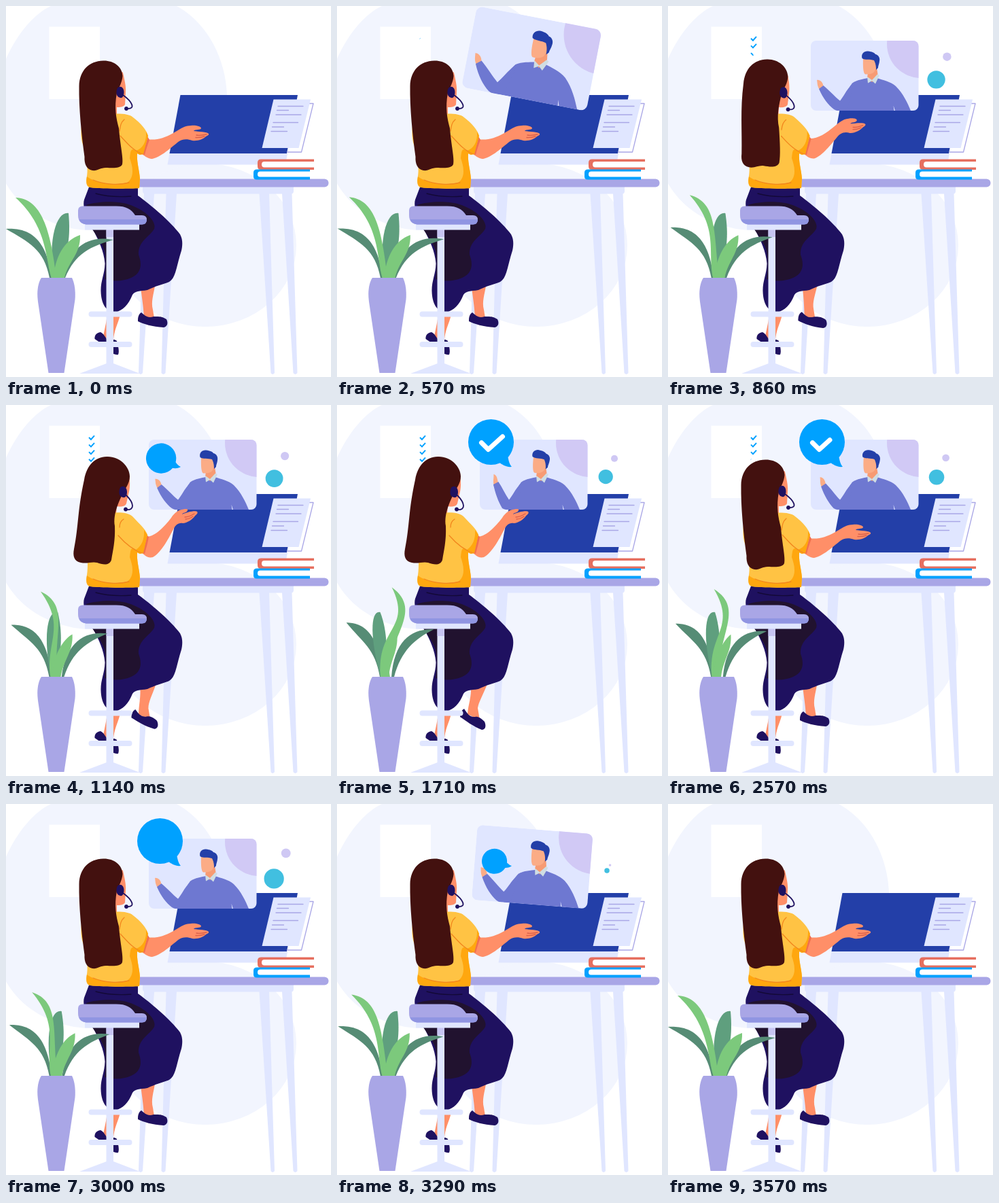
These frames come from a looping animation (478 by 546 pixels, 3640 ms). An HTML page:

```html
<!DOCTYPE html>
<html lang="en">
<head>
<meta charset="utf-8">
<title>Support desk</title>
<style>
html, body { margin: 0; width: 100%; height: 100%; overflow: hidden; background: #fff; }
svg { display: block; width: 478px; height: 546px; }
.haze { fill: #f2f5fe; } .pale { fill: #e0e6ff; } .lilac { fill: #a9a6e6; }
.blue { fill: #233fa8; } .sky { fill: #00a1ff; } .navy { fill: #1f1160; }
.skin { fill: #ff8f68; } .yellow { fill: #ffc344; } .orange { fill: #ffa70f; }
.hair { fill: #43110f; } .dark { fill: #568c75; } .mid { fill: #5f9f7e; } .leaf { fill: #7cc97c; }
.coat { fill: #6e78d1; } .face { fill: #fbac86; }
.line { fill: none; stroke-width: 1.3; stroke-linecap: round; stroke-linejoin: round; }
.rule { stroke: #a9a6e6; } .seam { stroke: #f2861d; } .wire { stroke: #1f1160; stroke-width: 1.8; }
.tick { fill: none; stroke: #00a1ff; stroke-width: 2; }
</style>
</head>
<body>
<svg viewBox="0 0 478 546">
  <defs><clipPath id="frame"><rect x="210" y="51" width="158.5" height="103" rx="8"/></clipPath></defs>

  <g class="haze">
    <path d="M66 0C40 12 12 45 -6 92V250C12 288 45 317 100 328C140 334 175 325 200 310C270 270 325 200 325 130C323 78 297 25 251 0Z"/>
    <ellipse cx="293" cy="352" rx="134" ry="120"/>
  </g>
  <path fill="#fff" d="M63.500 30.500H138V137H63.500Z"/>
  <g id="ticks"></g>

  <!-- desk -->
  <g class="pale">
    <path d="M201 266H423V272Q423 276.500 419 276.500H205Q201 276.500 201 272Z"/>
    <path d="M203 276H218L201 540Q198 544 195 540Z"/>
    <path d="M235.500 276H251L234.500 540Q231.500 544 228.500 540Z"/>
    <path d="M372.500 276H387L395 540Q392 544 389.500 540Z"/>
    <path d="M406 276H420.500L428.500 540Q425.500 544 422.500 540Z"/>
  </g>
  <path class="lilac" d="M190 254.500H468.500A6 6 0 0 1 468.500 266.500H190Z"/>
  <path class="blue" d="M256.500 131H429L413 217H240.500Z"/>
  <path class="pale" d="M240.500 217H414L411 233.500H237.500Z"/>
  <path class="line rule" d="M446 143.500H452L434.500 215H413.500"/>
  <path class="pale" d="M393.500 137.500H448L430.500 209H376.500Z"/>
  <path class="line rule" d="M400 147.500H437M398.500 153.500H415.500M397 160H434M393 171.500H429.500M391.500 178H408.500M390 184.500H413.500"/>
  <path fill="#e66f5f" d="M453 225.500H375Q370 225.500 370 230.500V236Q370 241 375 241H453Z"/>
  <path fill="#fff" d="M453 229H380Q376 229 376 233.200T380 237.500H453Z"/>
  <path class="sky" d="M447 240.500H369Q364 240.500 364 245V251Q364 255.500 369 255.500H447Z"/>
  <path fill="#fff" d="M447 243.500H374Q370 243.500 370 247.700T374 251.500H447Z"/>

  <!-- video call -->
  <circle id="teal" fill="#41bfe0"/>
  <circle id="violet" fill="#cfc8f4"/>
  <g id="card">
    <g clip-path="url(#frame)">
      <path class="pale" d="M210 51H369V154H210Z"/>
      <circle cx="372" cy="56" r="50" fill="#d1c9f5"/>
      <path class="face" data-m="wave" d="M223 123C219 117 220 114 219 109C223 108 228 112 228.500 118Z" data-to="M231 119C229 111 231 108 230.500 102C234 102 236 107 237 114Z"/>
      <path class="coat" d="M254 154C262 140 262 124 271 113.500C278 108.500 288 107.500 294 106H307C316 109 327 111 335 118C346 129 352 142 357 154H334L331.500 146.500L332.500 154Z"/>
      <path class="coat" data-m="wave" d="M222 122C228 136 236 146 244 152C250 156 256 154 264 152L274 112C264 120 260 131 253 139.500C246 134 237 124 228.500 117Z" data-to="M230 117C233 130 237 142 243 152C250 156 256 154 264 152L274 112C264 120 260 131 253 139.500C247 131 243 121 237.500 113Z"/>
      <path fill="#f79b73" d="M294 98L307 90L309 104L300 112L293 105Z"/>
      <g id="head">
        <path class="face" d="M287 77L305 75L309 84C308 90 305 92 304 96C301 100 296 101 290 100.500C287 99 286.500 88 287 77Z"/>
        <path class="blue" d="M285.500 77C283.500 70 289 66 294 66.500C300 67 304 69 305 71C310 72 312 77 311 81C310.500 86 309 88 309 91L306 94C306 87 305 84 303 80C297 78 290 80 285.500 77Z"/>
      </g>
      <path fill="#cfdde3" d="M293 104L294 113.500L300 110L305 114.500L311 102L308 100.500L300 109Z"/>
    </g>
  </g>
  <g id="bubble">
    <circle class="sky" cx="226.500" cy="54.500" r="33.500"/>
    <path class="sky" d="M251 74C252 81 254 88 257 91C250 92 243 88 238 84Z"/>
    <path id="mark" pathLength="1" fill="none" stroke="#fff" stroke-width="7" stroke-linecap="round" stroke-linejoin="round" d="M212.500 55.500L222.500 65.500L243.500 46.500"/>
  </g>

  <!-- woman, lower half -->
  <path class="skin" data-m="foot" d="M198 414L219 412C217 425 213 435 216 447L218 459L203 458C202 442 200 430 198 414Z" data-to="M197 414L221 411C214 428 208 438 207 446L210 464L192 455C193 440 198 430 197 414Z"/>
  <path class="navy" data-m="foot" d="M199 451C194 454 194 460 194 464C202 468 215 472 232 473C237 472 239 467 236 461C229 456 223 457 217 457C208 460 204 455 199 451Z" data-to="M187 447C182 450 181 455 181 459C190 465 200 473 213 478C218 478 220 473 217 466C211 460 207 458 203 459C195 460 191 453 187 447Z"/>
  <path class="skin" d="M150 446L168 454C165 468 158 478 158 494L143 487C145 475 148 465 150 446Z"/>
  <path class="navy" d="M139 480C132 481 130 486 130.500 490C137 495 145 498 150 504C155 511 160 514 165 513C167 508 165 500 163 493C158 488 153 494 149 491C146 488 144 482 139 480Z"/>
  <path class="navy" d="M123 264L194 266V279C212 292 242 317 256 336C261 345 259 355 258 360C250 385 250 400 240 406C230 410 220 412 208 418C196 420 190 419 186 425C180 440 172 448 160 451C147 450 140 438 139.500 420C139 405 145 395 145.500 379C144 360 136 345 130 333C118 315 112 295 115 285Z"/>
  <path fill="#21122f" d="M118 293C135 287 165 287 180 292C206 300 222 318 218 328C211 340 194 346 195 366C201 382 198 394 184 400C172 405 160 406 145 402C147 385 147 375 145 360C140 345 130 335 122 320Z"/>
  <path class="line" stroke="#130936" d="M132 276C150 281 170 281 184 280"/>

  <!-- stool -->
  <g class="pale">
    <path d="M116 321H196V329.500H116ZM147.500 329H158V530H147.500ZM108 541L148 526H158L197 541Z"/>
    <rect x="121.500" y="449.500" width="64" height="8" rx="4"/>
    <rect x="121.500" y="494" width="64" height="8" rx="4"/>
  </g>
  <path fill="#c7c5f2" d="M147.500 329.500H158V340H147.500Z"/>
  <path class="lilac" d="M113 294.500H162C177 294.500 184 299 190 308H200Q207 308 207 314.500T200 321.500H118Q106 320 106 308V301Q106 294.500 113 294.500Z"/>
  <path fill="#9095e2" d="M107.500 314H207Q207 321.500 200 321.500H118Q110 321 107.500 314Z"/>

  <!-- woman, upper half -->
  <path class="skin" data-m="body" d="M208 196C220 198 232 195 246 187C255 182 262 176 272 176C278 175 287 177 287 180C286 183 278 181 276 184C283 185 296 185 298 188C299 190 296 191 294 192C290 196 282 199 274 198C265 195 258 196 252 201C240 211 225 224 214 225C207 224 203 220 199 217Z" data-to="M207 194C220 193 233 179 243 166C246 161 252 155 258 154C263 153 268 152 267 155C266 159 260 158 259 161C265 158 278 155 281 157C283 159 280 161 278 163C275 168 266 174 260 174C254 173 250 176 247 181C241 193 229 217 216 224C208 226 204 221 199 217Z"/>
  <path class="line" stroke="#d9604a" stroke-width="1" data-m="body" d="M280 190C285 191 290 190 295 189M279 193.500C284 194 288 193 292 192" data-to="M263 165C268 165 272 163 277 160M264 168C268 168 272 166 275 164"/>
  <path fill="#f0704f" data-m="body" d="M207 190L211 197C208 205 206 211 204 219L199 217Z" data-to="M205 189L210 194C208 205 206 211 204 219L199 217Z"/>
  <path class="skin" data-m="body" d="M163 92L172 98C174 108 177 118 176 128L175 145C173 149 167 149 163 149L163 161L148 161Z" data-to="M168 92L181 105C183 115 182 125 180 132L177 145C175 150 168 150 163 149L162 161L148 161Z"/>
  <path class="yellow" data-m="body" d="M150 159C166 158 181 158 187 164C198 172 207 183 209 191L201 218C198 220 196 219 193 217C192 230 196 240 197 254L196 268C180 269 140 269 124 267C117 266 118 258 119 250C121 238 118 215 113 204C110 195 110 185 111 175Z" data-to="M150 159C166 158 180 157 188 166C196 175 205 182 208 191L201 218C198 220 196 219 193 217C192 230 196 240 197 254L196 268C180 269 140 269 124 267C117 266 118 258 119 250C121 238 119 225 122 210C124 195 122 185 125 175Z"/>
  <path class="orange" d="M119 251C135 263 162 264 178 260C190 252 186 235 182 224C183 216 183 211 187 211L200 218Q197 220 193 217C192 230 196 240 197 254L196 268C180 269 140 269 124 267Q116 265 119 251Z"/>
  <path class="orange" data-m="body" d="M206 185L209 191L202 218L191 213C201 210 207 200 206 185Z" data-to="M203 184L208 191L202 218L191 213C199 208 204 198 203 184Z"/>
  <path class="line seam" data-m="body" d="M174 167C169 171 168 177 167 184M168 191C175 198 186 213 201 218" data-to="M173 168C168 171 167 176 167 180M165 192C172 200 184 213 201 218"/>
  <path class="line seam" d="M128 256C145 263 165 264 181 260"/>
  <path class="hair" data-m="body" d="M143 80.500C158 80 171 89 171.500 103C171 112 166 120 163 128C159 150 162 165 166 180C168 205 173 225 171 233C168 240 155 238 147 238C138 238 135 243 127 242C118 240 115 232 115.500 222C111 190 107 150 107.500 118C108 95 122 81 143 80.500Z" data-to="M148 76C166 75 182 90 182 105C182 115 176 122 173 128C167 140 157 160 160 178C161 200 157 215 155 228C152 237 142 235 134 232C126 230 120 234 110 232C100 230 98 222 100 212C107 178 105 155 115 110C119 88 131 76.500 148 76Z"/>
  <path class="navy" data-m="body" d="M167 119C171 118 174 123 173.500 128C173 133 171 136 168 135C164 134 162 131 162.500 126C163 122 164 119 167 119Z" data-to="M171 120C175 119 178 123 178 128C178 133 176 137 172 136C168 135 166 132 166.500 127C167 123 168 120 171 120Z"/>
  <path class="line wire" data-m="body" d="M172 131C186 141 191 152 178 151" data-to="M177 133C188 144 190 155 177 154"/>
  <path class="navy" data-m="body" d="M177 148C181 148 181 154 177 154C173 154 173 148 177 148Z" data-to="M176 150.500C180 150.500 180 156.500 176 156.500C172 156.500 172 150.500 176 150.500Z"/>

  <!-- plant -->
  <path class="dark" data-m="sway" d="M0 328C30 326 60 338 67 400L64 400C56 358 34 348 0 328Z" data-to="M14 320C38 320 62 334 67 400L63 400C56 358 38 350 14 320Z"/>
  <path class="dark" data-m="sway" d="M158 344C118 336 92 358 84 400L87 400C102 364 124 354 158 344Z" data-to="M142 330C110 328 84 346 80 400L84 400C94 362 114 344 142 330Z"/>
  <path class="mid" data-m="sway" d="M92 305C75 302 62 340 69 400L76 400C92 360 95 340 92 305Z" data-to="M63 305C49 301 47 340 64 400L72 400C74 360 73 330 63 305Z"/>
  <path class="leaf" data-m="sway" d="M14 282C52 283 66 330 74 400L67 400C58 375 62 325 14 282Z" data-to="M82 268C132 305 70 345 78 400L64 400C58 325 112 330 82 268Z"/>
  <path class="leaf" data-m="sway" d="M109 337C85 345 72 370 70 400L86 400C92 375 110 365 109 337Z" data-to="M88 338C82 345 66 370 66 400L76 400C78 375 90 362 88 338Z"/>
  <path class="lilac" d="M52 400H97C101 408 102.500 420 101.500 432L85.500 540H62.500L47 435C45 420 47 408 52 400Z"/>
</svg>
<script>
const LOOP = 3640, STEP = 71.4;
const $ = id => document.getElementById(id);
const clamp = x => Math.min(1, Math.max(0, x));

// [time, value] stops, eased in and out between neighbours
const tracks = {
  sway: [[360, 0], [1840, 1], [2150, 1], [3570, 0]],
  body: [[600, 0], [1140, 1], [1720, 1], [2430, 0]],
  foot: [[640, 0], [1400, 1], [1740, 1], [2430, 0]],
  wave: [[1080, 0], [1760, 1], [2000, 1], [3000, 0]],
  card: [[210, 0], [570, 1.18], [800, 1], [3070, 1], [3220, 1.18], [3570, 0]],
  bubble: [[930, 0], [1140, .66], [1215, 1.12], [1290, 1], [3000, 1], [3140, 1.1], [3430, 0]],
  dots: [[555, 0], [930, 1.1], [1400, .8], [2430, .8], [2990, 1.1], [3430, 0]],
  mark: [[1300, 0], [1690, 1], [2450, 1], [2900, 0]],
  list: [[540, 0], [1100, 1], [2400, 1], [2930, 0]]
};

function track(name, t) {
  const stops = tracks[name];
  if (t <= stops[0][0]) return stops[0][1];
  for (let i = 1; i < stops.length; i++) {
    const [t0, a] = stops[i - 1], [t1, b] = stops[i];
    if (t <= t1) {
      const x = (t - t0) / (t1 - t0);
      return a + (b - a) * x * x * (3 - 2 * x);
    }
  }
  return stops[stops.length - 1][1];
}

const NUM = /-?[\d.]+/g;
const morphs = [...document.querySelectorAll('[data-m]')].map(el => ({
  el, name: el.dataset.m, from: el.getAttribute('d'), to: el.dataset.to.match(NUM)
}));

function morph({ el, name, from, to }, t) {
  const u = track(name, t);
  let i = 0;
  el.setAttribute('d', from.replace(NUM, n => (+n + (to[i++] - n) * u).toFixed(2)));
}

const ticks = [0, 1, 2, 3].map(i => {
  const p = document.createElementNS('http://www.w3.org/2000/svg', 'path');
  p.setAttribute('d', `M122 ${47.7 + i * 10.7}l3 3l5 -5.5`);
  p.setAttribute('pathLength', 1);
  p.setAttribute('class', 'tick');
  $('ticks').append(p);
  return p;
});

function reveal(el, p) {
  el.style.visibility = p > 0 ? 'visible' : 'hidden';
  el.setAttribute('stroke-dasharray', `${p} 2`);
}

// grow and turn around a corner
function pop(el, s, x, y, turn) {
  el.style.display = s > 0 ? '' : 'none';
  el.setAttribute('transform',
    `translate(${x} ${y}) rotate(${(s - 1) * turn}) scale(${s}) translate(${-x} ${-y})`);
}

function dot(el, x, y, r) {
  el.setAttribute('cx', x);
  el.setAttribute('cy', y);
  el.setAttribute('r', r);
}

function draw(t) {
  morphs.forEach(m => morph(m, t));
  pop($('card'), track('card', t), 370, 146, 61);
  pop($('bubble'), track('bubble', t), 257, 91, 79);
  const q = track('dots', t), w = track('wave', t);
  dot($('violet'), 398 + 12.5 * q, 96 - 21.5 * q, 6.3 * q);
  dot($('teal'), 398 - 3.5 * q, 94 + 14.5 * q, 13.3 * q);
  $('head').setAttribute('transform', `rotate(${4 * w} 300 106)`);
  reveal($('mark'), track('mark', t));
  const shown = track('list', t) * ticks.length;
  ticks.forEach((el, i) => reveal(el, clamp(shown - i)));
}

const start = performance.now();
function tick() {
  const t = (performance.now() - start) % LOOP;
  draw(Math.floor((t + 5) / STEP) * STEP);
  requestAnimationFrame(tick);
}
tick();
</script>
</body>
</html>
```
